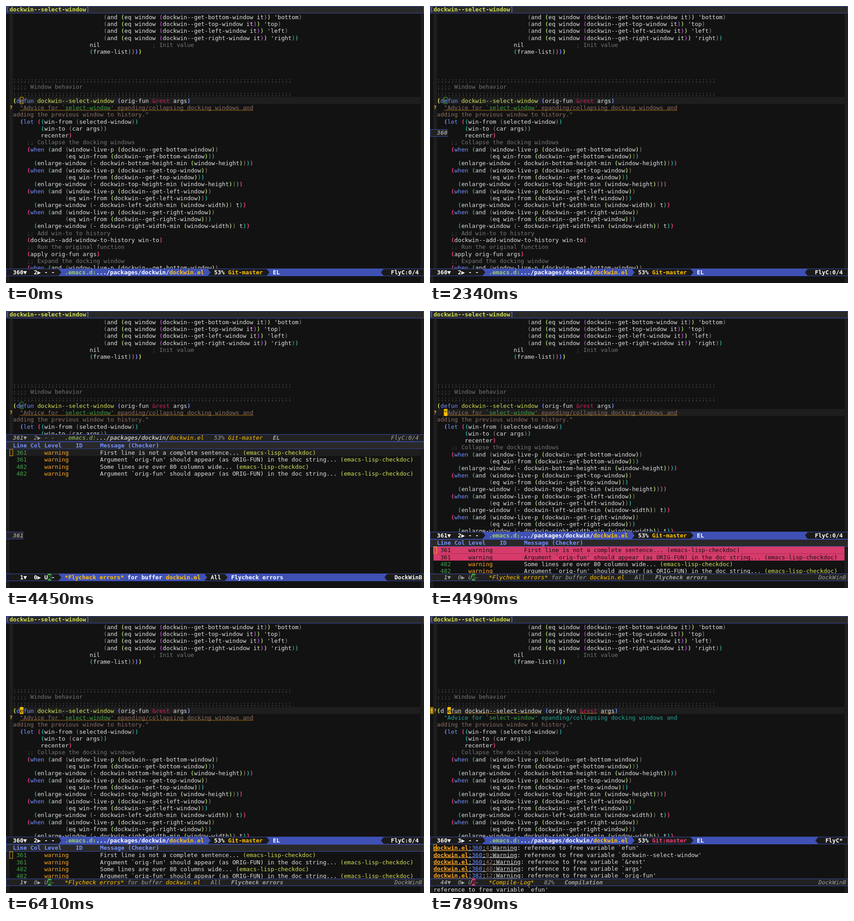
Animation of 919x609 px, one loop 8 s. Source, as an HTML page:

```html
<!DOCTYPE html>
<html lang="en">
<head>
<meta charset="utf-8">
<title>Docking windows</title>
<style>
  html, body { margin: 0; width: 100%; height: 100%; overflow: hidden; background: #121212; }
  #screen { display: block; width: 100vw; height: 100vh; }
  text { font: 13.288px "DejaVu Sans Mono", monospace; white-space: pre; fill: #e0e0e0; }
  .b { font-weight: bold; }
  .i { font-style: italic; }
  .u { text-decoration: underline; }
</style>
</head>
<body>
<svg id="screen" viewBox="0 0 960 636" preserveAspectRatio="none"></svg>
<script>
const LOOP = 8000, CELL = 8, ROW = 16, BAR = 17, WIDTH = 960, HEIGHT = 636;
const BOTTOM = HEIGHT - ROW - BAR, EDGE = WIDTH - CELL, ARROW = 7;
const C = {
  bg: '#121212', bar: '#212121', head: '#292929', hl: '#1e1e1e', fringe: '#1e1e1e',
  fg: '#e0e0e0', white: '#ffffff', dim: '#9e9e9e', comment: '#757575', semi: '#4a4a4a',
  indigo: '#3f51b5', blue: '#738ffe', lime: '#d4e157', pink: '#ec407a', rose: '#d81b60',
  mark: '#d63b6b', teal: '#26a69a', brown: '#8d6e63', tan: '#a1887f', leaf: '#9ccc65',
  purple: '#ab47bc', green: '#43a047', amber: '#ffc107', orange: '#ffa726'
};
const DEPTH = [C.lime, C.blue, C.pink, C.teal, C.tan, C.leaf, C.purple];

const SIDES = [['bottom', 'height'], ['top', 'height'], ['left', 'width'], ['right', 'width']];
const DEFUN = 12, DOC = 13;
const when = side => [
  `    (when (and (window-live-p (dockwin--get-${side}-window))`,
  `               (eq win-from (dockwin--get-${side}-window)))`
];
const code = [
  ...SIDES.map(([side]) => ' '.repeat(26) +
    `(and (eq window (dockwin--get-${side}-window it)) '${side})` + (side === 'right' ? ')' : '')),
  ' '.repeat(22) + 'nil' + ' '.repeat(15) + '; Init value',
  ' '.repeat(22) + '(frame-list))))',
  '', '', '',
  ';'.repeat(80),
  ';;;; Window behavior',
  ';'.repeat(80),
  '(defun dockwin--select-window (orig-fun &rest args)',
  '  "Advice for `select-window\' epanding/collapsing docking windows and',
  'adding the previous window to history."',
  '  (let ((win-from (selected-window))',
  '        (win-to (car args))',
  '        recenter)',
  '    ;; Collapse the docking windows',
  ...SIDES.flatMap(([side, dim]) => [...when(side),
    `      (enlarge-window (- dockwin-${side}-${dim}-min (window-${dim}))` +
    (dim === 'width' ? ' t))' : '))')]),
  '    ;; Add win-to to history',
  '    (dockwin--add-window-to-history win-to)',
  '    ;; Run the original function',
  '    (apply orig-fun args)',
  '    ;; Expand the docking window',
  when('bottom')[0]
];
const EDITED = code[DEFUN].replace('(d', '(d ');

const SENTENCE = 'First line is not a complete sentence';
const ARGUMENT = "Argument `orig-fun' should appear (as ORIG-FUN) in the doc string";
const issues = [[361, SENTENCE], [361, ARGUMENT], [482, 'Some lines are over 80 columns wide'], [482, ARGUMENT]];
const warnings = [
  [360, 4, 'efun'], [360, 9, 'dockwin--select-window'], [360, 42, '&rest'],
  [360, 48, 'args'], [382, 12, 'orig-fun']
];
const FILE = '/home/tobrel/.emacs.d/personal/packages/dockwin/dockwin.el';
const HIGH = 283, LOW = 507;

// Each step lists only what changes at that time.
const steps = [
  [0, { split: BOTTOM, focus: 'code', row: DEFUN, col: 2, cursor: 'hollow', tint: C.amber, hl: DEFUN,
        line: '360', column: '2', flag: ' ', fly: 'FlyC:0/4', git: 'Git-master', echo: [],
        listRow: 0, listLine: '1', listCursor: 'solid', listTint: C.green, listHl: true }],
  [1380, { cursor: 'solid' }],
  [2340, { cursor: 'hollow', tint: C.green, stub: HIGH }],
  [2380, { stub: 0, split: HIGH, focus: 'list', hl: -1 }],
  [3310, { listCursor: '', listLine: '2' }],
  [3350, { listCursor: 'solid', listRow: 1 }],
  [3780, { listCursor: '', listLine: '1' }],
  [3820, { listCursor: 'solid', listRow: 0 }],
  [4450, { listCursor: 'hollow', listTint: C.amber, line: '361', stub: LOW }],
  [4490, { stub: 0, split: LOW, focus: 'code', row: DOC, hl: DOC, cursor: 'solid', tint: C.amber,
           marked: true, listHl: false }],
  [5390, { echo: [SENTENCE, '', ARGUMENT] }],
  [6370, { echo: [], row: DEFUN, hl: DEFUN, line: '360' }],
  [6410, { marked: false }],
  [6870, { edited: true, col: 3 }],
  [6910, { flag: '*', column: '3', broken: true }],
  [7360, { echo: [`Saving file ${FILE}...`] }],
  [7400, { fly: 'FlyC*' }],
  [7490, { flag: ' ', echo: [`Wrote ${FILE}`] }],
  [7540, { git: 'Git:master' }],
  [7590, { echo: [`Compiling ${FILE}...`] }],
  [7640, { log: true }],
  [7700, { echo: [`Compiling ${FILE}...done`] }],
  [7760, { echo: [`Wrote ${FILE}c`] }],
  [7840, { checked: true }],
  [7890, { echo: ["reference to free variable `efun'"] }]
];
let last = {};
const states = steps.map(([, change]) => last = { ...last, ...change });

const esc = s => s.replace(/&/g, '&amp;').replace(/</g, '&lt;');
const rect = (x, y, w, h, fill) => `<rect x="${x}" y="${y}" width="${w}" height="${h}" fill="${fill}"/>`;
const frame = (x, y, w, h, stroke, fill = 'none') =>
  `<rect x="${x + .5}" y="${y + .5}" width="${w - 1}" height="${h - 1}" fill="${fill}" stroke="${stroke}"/>`;
const poly = (fill, ...points) => `<polygon points="${points.join(' ')}" fill="${fill}"/>`;
const pane = (y, h, body) => `<svg y="${y}" width="${WIDTH}" height="${h}">${body}</svg>`;

// A run is [string, colour, classes]; y is the top of the text row.
const text = (x, y, runs) => `<text x="${x}" y="${y + 13}">` + runs.map(([s, fill = C.fg, cls = '']) =>
  `<tspan fill="${fill}" class="${cls}">${esc(s)}</tspan>`).join('') + '</text>';
const span = runs => CELL * runs.reduce((n, [s]) => n + s.length, 0);
const wave = (x, y, cells) =>
  `<path d="M${x} ${y + 15.5}${'l2 -2 2 2'.repeat(cells * 2)}" fill="none" stroke="#c98a1c"/>`;
const fringes = (x, h) => rect(x, 0, CELL, h, C.fringe) + rect(EDGE, 0, CELL, h, C.fringe);

function cursor(kind, x, y, tint, char) {
  if (kind === 'hollow') return frame(x, y, CELL, ROW, tint);
  if (kind === 'solid') return rect(x, y, CELL, ROW, tint) + text(x, y, [[char, C.bg]]);
  return '';
}

function docRuns(line, first, broken) {
  const color = broken && first ? C.teal : C.brown;
  return line.split(/(select-window)/).map((s, i) => [s, i % 2 ? C.green : color]);
}

function colorize() {
  let depth = 4;
  return (line, index, s) => {
    if (index === DOC || index === DOC + 1) return docRuns(line, index === DOC, s.broken);
    const [, body, semis, comment] = line.match(/^([^;]*)(;*)(.*)$/);
    const runs = body.split(/([()]|&rest|(?<=\()(?:let|when|defun)\b|(?<=defun )\S+)/).map((part, i) => {
      if (i % 2 === 0) return [part];
      if (part === '&rest') return [part, C.rose];
      if (part === '(' || part === ')') {
        const level = part === '(' ? depth++ : --depth;
        return [part, DEPTH[level], DEPTH[level] === C.tan ? '' : 'b'];
      }
      return [part, /^(let|when|defun)$/.test(part) ? C.blue : C.lime];
    });
    return [...runs, [semis, C.semi], [comment, C.comment]];
  };
}

function codePane(s) {
  const h = s.split - BAR, runsOf = colorize();
  const lines = code.map((line, i) => i === DEFUN && s.edited ? EDITED : line);
  let out = fringes(CELL, h);
  if (s.hl >= 0) out += rect(16, s.hl * ROW, EDGE - 16, ROW, C.hl);
  out += lines.map((line, i) => text(16, i * ROW, runsOf(line, i, s))).join('');
  const icon = row => `<text x="8.5" y="${row * ROW + 12}" class="b" style="font-size:11px;fill:${C.amber}">?</text>`;
  if (s.checked) {
    const y = DEFUN * ROW;
    out += rect(0, y, CELL, ROW, '#97700c') + text(0, y, [['!', '#ffe082', 'b']]) + icon(DEFUN);
    for (const word of ['efun', 'dockwin--select-window', '&rest', 'args'])
      out += wave(16 + CELL * EDITED.indexOf(word), y, word.length);
  } else {
    out += icon(DOC) + wave(32, DOC * ROW, code[DOC].length - 2);
  }
  out += cursor(s.cursor, 16 + s.col * CELL, s.row * ROW, s.tint, lines[s.row][s.col]);
  return pane(BAR, h, out);
}

function listPane(s, y, h) {
  let out = fringes(0, h);
  const from = s.listCursor ? 8 : 48;
  if (s.listHl) out += rect(from, s.listRow * ROW, EDGE - from, ROW, C.hl);
  issues.forEach(([line, message], i) => {
    const on = s.marked && i < 2, ink = color => on ? C.bg : color;
    if (on) out += rect(8, i * ROW, EDGE - 8, ROW, C.mark);
    out += text(8, i * ROW, [
      [`  ${line}     `, ink(C.green)], ['warning'.padEnd(16), ink(C.orange)],
      [message + '... ', ink(C.fg)], ['(emacs-lisp-checkdoc)', ink(C.lime)]
    ]);
  });
  out += cursor(s.listCursor, 8, s.listRow * ROW, s.listTint, ' ');
  return frame(0, y, WIDTH, BAR, C.indigo, C.head) +
    text(8, y, [[' Line Col Level    ID     Message (Checker)', C.blue, 'b']]) +
    pane(y + BAR, h - BAR, out);
}

function logPane(y, h) {
  const rows = warnings.map(([line, column, name], i) => text(8, i * ROW, [
    ['dockwin.el', C.orange, 'b u'], [':', C.fg, 'u'], [`${line}`, C.blue, 'u'], [':', C.fg, 'u'],
    [`${column}`, C.brown, 'u'], [':Warning', C.fg, 'u'], [`: reference to free variable \`${name}'`]
  ]));
  return pane(y, h, fringes(0, h) + rows.join('') + cursor('hollow', 8, 0, C.amber));
}

function modeLine(y, active, { line, column, flags, flagFill, name, place, mode, right, rightX }) {
  const style = active ? 'b' : 'i', plain = active ? C.white : C.dim;
  const gap = CELL + ARROW + CELL, first = 15 * CELL, nameX = first + ARROW + CELL;
  const placeX = nameX + span(name) + gap, modeX = placeX + span(place) + gap;
  const styled = runs => runs.map(([s, color]) => [s, color || plain, style]);
  let out = rect(0, y, WIDTH, BAR, C.bar);
  if (active) {
    const mid = y + BAR / 2, end = y + BAR;
    const a = placeX - gap + CELL, b = modeX - gap + CELL, r = rightX - gap;
    out = rect(0, y, WIDTH, BAR, '#1a1a1a') +
      poly(C.indigo, [first, y], [a, y], [a + ARROW, mid], [a, end], [first, end], [first + ARROW, mid]) +
      poly(C.indigo, [b, y], [r + ARROW, y], [r, mid], [r + ARROW, end], [b, end], [b + ARROW, mid]);
  }
  out += frame(0, y, WIDTH, BAR, C.indigo);
  if (flagFill) out += rect(96, y, CELL, ROW, flagFill);
  out += text(0, y, [
    [line.padStart(5) + '▼', plain, 'b ' + style], [`  ${column}▶ ${flags[0]}`, plain, style],
    [flags[1], flagFill ? C.bg : plain, 'b ' + style], [flags[2], plain, style]
  ]);
  return out + text(nameX, y, styled(name)) + text(placeX, y, styled(place)) +
    text(modeX, y, [[mode, plain, 'b ' + style]]) + text(rightX, y, styled([[right]]));
}

function codeMode(s) {
  return modeLine(s.split, s.focus === 'code', {
    line: s.line, column: s.column, flags: `-${s.flag}-`, flagFill: s.flag === '*' && C.mark,
    name: [['.emacs.d:', C.leaf], ['.../packages/dockwin/', C.white], ['dockwin.el', C.amber]],
    place: [['53% '], [s.git, s.git === 'Git:master' ? C.pink : C.amber]],
    mode: 'EL', right: s.fly, rightX: 948 - CELL * s.fly.length
  });
}

function dockMode(s, y) {
  const dock = { column: '0', flags: 'UR-', right: 'DockWinB', rightX: 892 };
  return modeLine(y, s.focus === 'list', s.log
    ? { ...dock, line: '44', flagFill: C.mark, name: [['*Compile-Log*', C.amber]], place: [['82%']], mode: 'Compilation' }
    : { ...dock, line: s.listLine, flagFill: C.green, place: [['All']], mode: 'Flycheck errors',
        name: [['*Flycheck errors*', C.amber], [' for buffer '], ['dockwin.el', C.amber]] });
}

function render(s) {
  const bottom = BOTTOM - ROW * Math.max(0, s.echo.length - 1), echoY = bottom + BAR;
  let out = rect(0, 0, WIDTH, HEIGHT, C.bg) + frame(0, 0, WIDTH, BAR, C.indigo, C.head) +
    text(0, 0, [['[', C.blue], ['dockwin--select-window', C.lime, 'b'], [']', C.blue]]) +
    codePane(s) + codeMode(s);
  if (s.split < BOTTOM) {
    const y = s.split + BAR;
    out += (s.log ? logPane(y, bottom - y) : listPane(s, y, bottom - y)) + dockMode(s, bottom);
  }
  if (s.stub) {
    out += rect(0, s.stub, 41, BAR, C.bar) + rect(0, s.stub, 41, 1, C.indigo) +
      rect(0, s.stub + BAR - 1, 41, 1, C.indigo) + rect(0, s.stub, 1, BAR, C.indigo) +
      text(0, s.stub, [['  ' + s.line, C.dim, 'b i']]);
  }
  return out + pane(echoY, HEIGHT - echoY, fringes(0, HEIGHT - echoY) +
    s.echo.map((line, i) => text(8, i * ROW, [[line]])).join(''));
}

const screen = document.getElementById('screen');
const start = performance.now();
let shown = -1;
function tick() {
  const t = (performance.now() - start) % LOOP;
  let index = steps.length - 1;
  while (steps[index][0] > t) index--;
  if (index !== shown) screen.innerHTML = render(states[shown = index]);
  requestAnimationFrame(tick);
}
tick();
</script>
</body>
</html>
```
